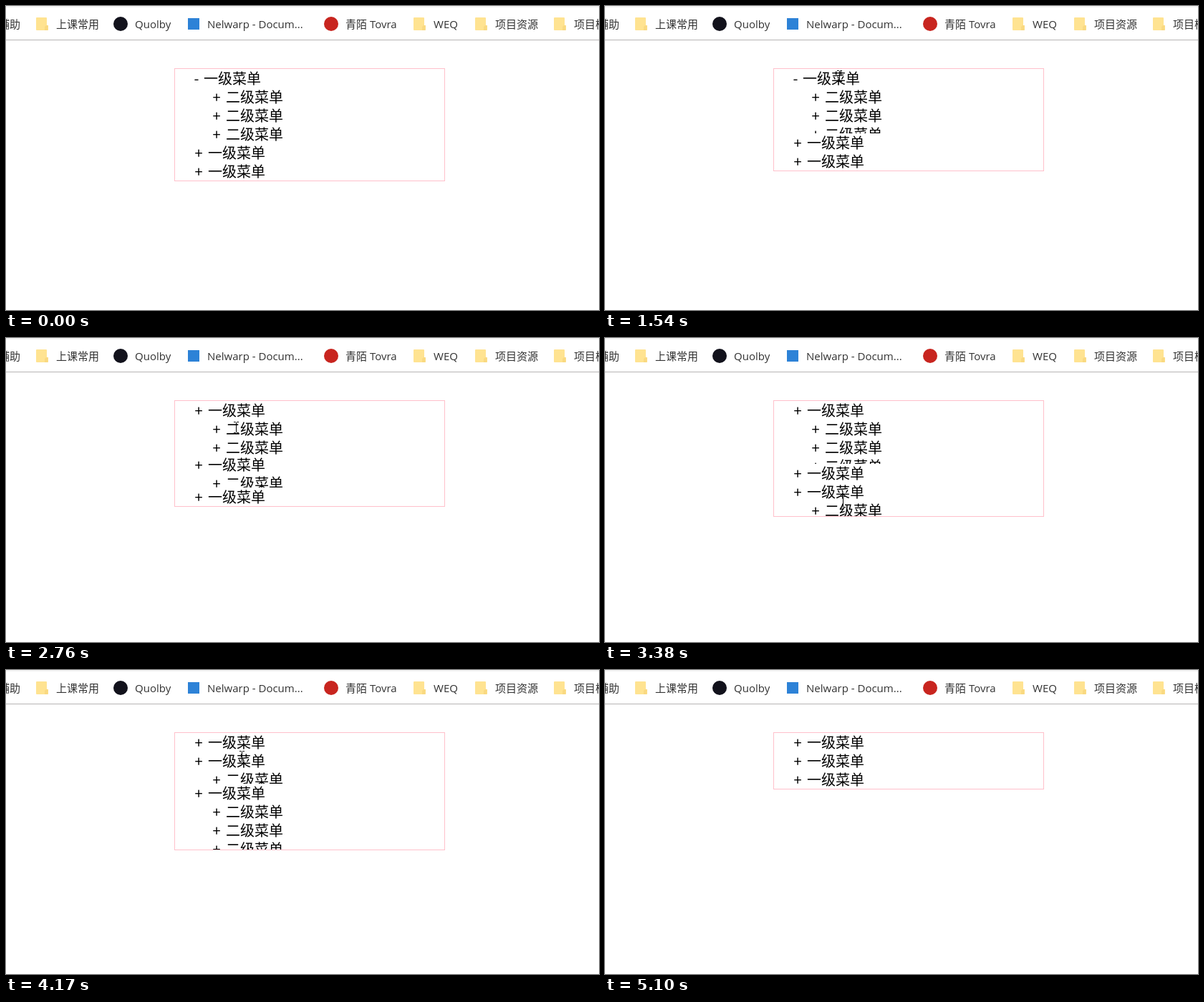
These frames come from a looping animation (828x425 px, 6.07 s). An HTML page:

```html
<!DOCTYPE html>
<html lang="zh-CN">
<head>
<meta charset="utf-8">
<title>折叠菜单</title>
<style>
  :root { --loop: 6070ms; --swing: cubic-bezier(.364, 0, .636, 1); }
  html, body { margin: 0; width: 100%; height: 100%; overflow: hidden; background: #fff; }
  body { position: relative; }
  .bar { position: absolute; left: 0; top: 0; }
  .bar text { font: 15px "Open Sans", "Noto Sans CJK SC", "Noto Sans CJK", sans-serif; fill: #333; }

  .menu {
    position: absolute; left: 235px; top: 87px; width: 376px;
    border: 1px solid pink; color: #000;
    font: 350 20px/26px "Noto Sans CJK SC", "Noto Sans CJK", sans-serif;
  }
  .row, .sub { overflow: hidden; }
  .row { height: 26px; }
  p { margin: 0; height: 26px; padding-left: 26px; white-space: nowrap; }
  .sub p { padding-left: 51px; }
  p::before { content: "+"; display: inline-block; width: 14px; margin-right: 6px; text-align: center; }
  p.minus::before { content: "-"; width: 8px; }

  .sub { height: 0; animation: var(--loop) var(--swing) infinite; }
  .flip { transform: translateY(-26px); animation: var(--loop) step-end infinite; }
  .one .sub { animation-name: slide1; }
  .two .sub { animation-name: slide2; }
  .three .sub { animation-name: slide3; }
  .one .flip { animation-name: flip1; }
  .two .flip { animation-name: flip2; }
  .three .flip { animation-name: flip3; }

  @keyframes slide1 {
    0%, 23.526% { height: 78px; }
    30.115%, 41.582% { height: 0; }
    48.171%, 53.707% { height: 78px; }
    60.297%, 100% { height: 0; }
  }
  @keyframes slide2 {
    0%, 34.563% { height: 0; }
    41.153%, 41.582% { height: 52px; }
    48.171%, 65.98% { height: 0; }
    72.57%, 75.124% { height: 52px; }
    81.713%, 100% { height: 0; }
  }
  @keyframes slide3 {
    0%, 53.707% { height: 0; }
    60.297%, 65.98% { height: 104px; }
    72.57%, 100% { height: 0; }
  }
  @keyframes flip1 {
    0%, 48.171% { transform: none; }
    30.115%, 53.707%, 100% { transform: translateY(-26px); }
  }
  @keyframes flip2 {
    0%, 41.582%, 81.713%, 100% { transform: translateY(-26px); }
    41.153%, 72.57% { transform: none; }
  }
  @keyframes flip3 {
    0%, 65.98%, 100% { transform: translateY(-26px); }
    60.297% { transform: none; }
  }

  .pointer { position: absolute; left: 0; top: 0; overflow: visible; animation: move var(--loop) ease-in-out infinite; }
  .arrow { animation: arrow var(--loop) step-end infinite; }
  .beam { animation: beam var(--loop) step-end infinite; }
  @keyframes move {
    0%, 3.46% { transform: translate(666px, 398px); }
    8.4%, 9.88% { transform: translate(430px, 251px); }
    20.26%, 21.75% { transform: translate(337px, 92px); }
    23.72%, 30.48% { transform: translate(327px, 98px); }
    33.77%, 38.71% { transform: translate(322px, 123px); }
    41.19%, 42.83% { transform: translate(323px, 90px); }
    45.47% { transform: translate(321px, 125px); }
    51.89%, 61.29% { transform: translate(332px, 229px); }
    65.24% { transform: translate(329px, 113px); }
    68.7%, 75.78% { transform: translate(329px, 121px); }
    82.7%, 100% { transform: translate(751px, 381px); }
  }
  @keyframes arrow {
    0%, 17.13%, 84.02%, 100% { visibility: hidden; }
    3.46%, 76.77% { visibility: visible; }
  }
  @keyframes beam {
    0%, 76.77%, 100% { visibility: hidden; }
    17.13% { visibility: visible; }
  }
</style>
</head>
<body>
<svg class="bar" width="828" height="48">
  <defs>
    <g id="folder">
      <path d="M0 1q0-1 1-1h13q1 0 1 1v10h2v6q0 1-1 1H1q-1 0-1-1z" fill="#ffe391"/>
      <path d="M12 18v-5l2-2h2.500v7z" fill="#f9d981"/>
    </g>
  </defs>
  <rect width="828" height="2" fill="#f2f2f2"/>
  <rect y="47" width="828" height="1" fill="#b6b4b4"/>
  <use href="#folder" x="42" y="16"/>
  <use href="#folder" x="569" y="16"/>
  <use href="#folder" x="655" y="16"/>
  <use href="#folder" x="765" y="16"/>
  <circle cx="160" cy="25" r="10" fill="#12121c"/>
  <rect x="254" y="17" width="16" height="16" fill="#2d82d7"/>
  <circle cx="454" cy="25" r="10" fill="#c8251f"/>
  <text x="-10" y="31">辅助</text>
  <text x="70" y="31">上课常用</text>
  <text x="180" y="31">Quolby</text>
  <text x="281" y="31">Nelwarp - Docum...</text>
  <text x="474" y="31">青陌 Tovra</text>
  <text x="597" y="31">WEQ</text>
  <text x="683" y="31">项目资源</text>
  <text x="793" y="31">项目模板</text>
</svg>

<div class="menu">
  <div class="one">
    <div class="row"><div class="flip"><p class="minus">一级菜单</p><p>一级菜单</p></div></div>
    <div class="sub"><p>二级菜单</p><p>二级菜单</p><p>二级菜单</p></div>
  </div>
  <div class="two">
    <div class="row"><div class="flip"><p class="minus">一级菜单</p><p>一级菜单</p></div></div>
    <div class="sub"><p>二级菜单</p><p>二级菜单</p></div>
  </div>
  <div class="three">
    <div class="row"><div class="flip"><p class="minus">一级菜单</p><p>一级菜单</p></div></div>
    <div class="sub"><p>二级菜单</p><p>二级菜单</p><p>二级菜单</p><p>二级菜单</p></div>
  </div>
</div>

<svg class="pointer" width="1" height="1">
  <path class="arrow" d="M.5.5v16l3.700-3.500 2.400 5.500 2.200-1-2.400-5.300h5z" fill="#fff" stroke="#000"/>
  <path class="beam" d="M-3-7.500h2.500l1 1 1-1H4M.5-6.500v13M-3 7.500h2.500l1-1 1 1H4" fill="none" stroke="#000"/>
</svg>
</body>
</html>
```
